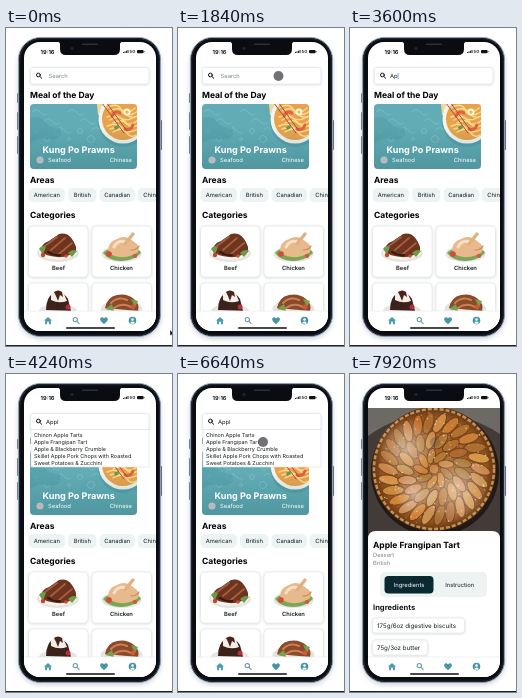
These frames come from a looping animation (166x318 px, 8 s). An HTML page:

```html
<!DOCTYPE html>
<html lang="en">
<head>
<meta charset="utf-8">
<title>Recipe app</title>
<style>
html,body{margin:0;width:100%;height:100%;overflow:hidden;background:#fff}
svg{display:block;width:100vw;height:100vh;font-family:Inter,"Open Sans",sans-serif;font-size:5.8px;text-rendering:geometricPrecision}
text{fill:#15191c;white-space:pre}
.h{font-size:8.5px;font-weight:700;fill:#000}
.b{font-weight:600}
.m{text-anchor:middle}
.w{fill:#fff}
.g{fill:#7d858a}
.card{fill:#fff;stroke:#e3e7e9;stroke-width:.7;filter:url(#soft)}
.chip{fill:#edf2f3}
.line{fill:none;stroke-linecap:round;stroke-linejoin:round}
</style>
</head>
<body>
<svg viewBox="0 0 166 318" preserveAspectRatio="none">
<defs>
  <filter id="soft" x="-20%" y="-20%" width="140%" height="150%"><feDropShadow dx="0" dy=".7" stdDeviation=".8" flood-color="#506068" flood-opacity=".25"/></filter>
  <filter id="halo" x="-20%" y="-20%" width="140%" height="140%"><feGaussianBlur stdDeviation="2.6"/></filter>
  <linearGradient id="shade" x2="0" y2="1"><stop offset=".35" stop-color="#27646e" stop-opacity="0"/><stop offset="1" stop-color="#27646e" stop-opacity=".3"/></linearGradient>
  <radialGradient id="crust"><stop offset="0" stop-color="#b8702c"/><stop offset=".85" stop-color="#94521f"/><stop offset="1" stop-color="#57300f"/></radialGradient>
  <radialGradient id="sugar" cx=".5" cy=".5"><stop offset="0" stop-color="#fff" stop-opacity=".5"/><stop offset="1" stop-color="#fff" stop-opacity="0"/></radialGradient>
  <clipPath id="screen"><rect x="18" y="14" width="132" height="289" rx="16"/></clipPath>
  <clipPath id="body"><rect x="18" y="29" width="132" height="254"/></clipPath>
  <clipPath id="meal"><rect x="24" y="76" width="107" height="65" rx="4"/></clipPath>
  <clipPath id="drop"><rect x="25" y="55.5" width="118" height="37.5"/></clipPath>
  <clipPath id="photo"><rect x="18" y="34" width="132" height="130"/></clipPath>
</defs>

<rect width="166" height="318" fill="#fff"/>
<rect y="317" width="166" height="1" fill="#222"/>

<!-- phone -->
<rect x="12" y="12" width="143" height="299" rx="23" fill="#8493a5" opacity=".4" filter="url(#halo)"/>
<g fill="#46505e">
  <rect x="11.3" y="65" width="2" height="10" rx=".7"/><rect x="11.3" y="84" width="2" height="18" rx=".7"/>
  <rect x="11.3" y="108" width="2" height="18" rx=".7"/><rect x="153.8" y="92" width="2" height="30" rx=".7"/>
</g>
<rect x="12.5" y="9.5" width="142" height="299" rx="22" fill="#0a0c11" stroke="#8f9eb1" stroke-width="1"/>
<rect x="13.7" y="10.7" width="139.6" height="296.6" rx="21" fill="none" stroke="#27303d" stroke-width=".9"/>

<g clip-path="url(#screen)">
  <rect x="18" y="14" width="132" height="289" fill="#fff"/>
  <g clip-path="url(#body)">
    <g id="home">
      <rect x="18" y="29" width="132" height="254" fill="#fff"/>
      <rect x="24.5" y="39.5" width="118.5" height="16.5" rx="3" class="card"/>
      <g class="line" stroke="#111" stroke-width="1"><circle cx="32.4" cy="47" r="1.9"/><path d="M33.9 48.5l1.8 1.8"/></g>
      <text id="hint" x="42.5" y="50" class="g">Search</text>
      <text id="query" x="40" y="50"></text>
      <path id="caret" d="M0 45v6" stroke="#3e7cf0" stroke-width=".7"/>

      <text class="h" x="24" y="70">Meal of the Day</text>
      <g clip-path="url(#meal)">
        <rect x="24" y="76" width="107" height="65" fill="#61acb5"/>
        <g id="waves" class="line" stroke="#8bc5ca" stroke-width=".6"></g>
        <path d="M24 90q10-3 15 4t14 5q5 4 1 9t-13 3-17 5z" fill="#529da8" opacity=".6"/>
        <path d="M91 76h12l-3 9-8 2z" fill="#f3d79c"/>
        <circle cx="117" cy="94" r="25" fill="#4d919d" opacity=".5"/>
        <circle cx="117" cy="91" r="24.5" fill="#f4f5ee"/>
        <circle cx="117" cy="91" r="21" fill="#e9a24c"/>
        <g id="noodles" class="line" stroke="#f9dc8f" stroke-width="1.4"></g>
        <g class="line" stroke="#e0633c" stroke-width="3"><path d="M106 88q3-6 8-3"/><path d="M119 101q6 2 8-4"/></g>
        <circle cx="121" cy="84" r="3.4" fill="#fff6df"/><circle cx="121" cy="84" r="1.6" fill="#efb23e"/>
        <path d="M108 99l4-2 1 3-4 2z" fill="#5f9b56"/>
        <path d="M96 75l22 30M100 74l21 29" class="line" stroke="#b34a3c" stroke-width="1"/>
        <rect x="24" y="76" width="107" height="65" fill="url(#shade)"/>
      </g>
      <text x="36.5" y="125" class="w" font-size="9.1" font-weight="700">Kung Po Prawns</text>
      <circle cx="34" cy="132" r="3.6" fill="#b9babd"/>
      <text x="42" y="134" class="w">Seafood</text>
      <text x="126" y="134" class="w" text-anchor="end">Chinese</text>

      <text class="h" x="24" y="155">Areas</text>
      <g id="areas"></g>
      <text class="h" x="24" y="190">Categories</text>
      <rect x="22.5" y="198" width="59.5" height="51" rx="4" class="card"/>
      <rect x="86" y="198" width="59.5" height="51" rx="4" class="card"/>
      <rect x="22.5" y="255" width="59.5" height="51" rx="4" class="card"/>
      <rect x="86" y="255" width="59.5" height="51" rx="4" class="card"/>
      <text x="52.5" y="242.3" class="b m">Beef</text>
      <text x="115.5" y="242.3" class="b m">Chicken</text>

      <!-- beef -->
      <ellipse cx="52" cy="225" rx="21" ry="9" fill="#e6e4df"/><ellipse cx="52" cy="223.5" rx="19" ry="8" fill="#f7f5ef"/>
      <path d="M35 224q-1-8 8-11l10-7q8-2 13 5t4 12q-8 7-19 6t-16-5z" fill="#6d3420"/>
      <path d="M39 218l12-9M45 222l14-12M53 226l13-11" class="line" stroke="#a65e3c" stroke-width="1.8"/>
      <path d="M42 224q6 4 12 3" class="line" stroke="#35170f" stroke-width="2"/>
      <path d="M33 221q3-5 7-2l-3 7zM62 225q5-5 9-2l-5 6z" fill="#6f9a4a"/><circle cx="37" cy="227" r="2.2" fill="#c8412e"/><circle cx="60" cy="228" r="1.8" fill="#cf4a2e"/>
      <!-- chicken -->
      <ellipse cx="115.5" cy="226" rx="20" ry="8" fill="#e4e5e0"/>
      <path d="M97 225q5-6 12-3l16-1q8-1 10 4-8 8-20 8t-18-8z" fill="#7ba653"/>
      <path d="M102 222q0-8 9-11 8-5 16 2 8 5 5 11-8 6-18 5t-12-7z" fill="#e7b98d"/>
      <path d="M108 219q4-8 12-5" class="line" stroke="#f7dfc4" stroke-width="3"/>
      <path d="M119 216l8-10" class="line" stroke="#e2af80" stroke-width="3.4"/>
      <path d="M125 222q6 0 8-4" class="line" stroke="#c98b58" stroke-width="1.2"/>
      <circle cx="103" cy="226" r="2.8" fill="#d54a34"/><circle cx="129" cy="228" r="2.1" fill="#d9533a"/>
      <!-- dessert -->
      <ellipse cx="52" cy="283" rx="19" ry="7" fill="#e7e4e2"/>
      <path d="M40 282q0-13 8-17 9-2 14 6l3 12z" fill="#3d211b"/><path d="M45 267q6-9 13-1l3 7q-8 3-16-1z" fill="#f3eee8"/>
      <path d="M48 264q4-3 8 0l1 5-3-2-2 6-2-5z" fill="#4a251c"/><circle cx="62" cy="279" r="2.5" fill="#b72d38"/>
      <!-- lamb -->
      <ellipse cx="115.5" cy="281" rx="21" ry="9" fill="#e5e3df"/>
      <path d="M99 280q2-11 12-13t17 4q6 5 4 12z" fill="#8b4a2b"/><path d="M105 275q7-7 16-3M108 280q8-6 17-1" class="line" stroke="#c98250" stroke-width="2"/>
      <path d="M99 281l7-5 2 7zM125 271l7 2-3 6z" fill="#76a04f"/><circle cx="127" cy="279" r="2.4" fill="#d4573a"/>

      <g id="list">
        <rect x="25" y="55.5" width="118" height="37.5" fill="#fff" stroke="#d9dee0" stroke-width=".6"/>
        <g id="rows" clip-path="url(#drop)" font-size="5.4"></g>
      </g>
    </g>

    <g id="detail">
      <rect x="18" y="29" width="132" height="254" fill="#fff"/>
      <g clip-path="url(#photo)">
        <rect x="18" y="34" width="132" height="130" fill="#433b37"/>
        <path d="M18 34h132v26q-30-20-66-20T18 62z" fill="#6d6a66"/>
        <g id="tart"></g>
      </g>
      <path d="M18 284V165q0-8 8-8h116q8 0 8 8v119z" fill="#fff"/>
      <text class="h" x="23" y="174.3" font-size="8.6">Apple Frangipan Tart</text>
      <text x="23" y="183" class="g">Dessert</text>
      <text x="23" y="191.2" class="g">British</text>
      <rect x="30" y="198" width="107" height="25" rx="5" class="chip"/>
      <rect x="34.5" y="202" width="49" height="17.5" rx="4" fill="#0b2930"/>
      <text x="59" y="213" class="w m">Ingredients</text>
      <text x="109.7" y="213" class="m">Instruction</text>
      <text x="23" y="235.5" font-size="7.6" font-weight="700">Ingredients</text>
      <rect x="22.5" y="244" width="92" height="15" rx="3" class="card"/>
      <text x="27" y="253.8" font-size="6.2">175g/6oz digestive biscuits</text>
      <rect x="22.5" y="266" width="55" height="15" rx="3" class="card"/>
      <text x="27" y="275.8" font-size="6.2">75g/3oz butter</text>
    </g>
  </g>

  <!-- tab bar -->
  <rect x="18" y="283" width="132" height="21" fill="#fff"/>
  <path d="M18 283h132" stroke="#e4e8ea" stroke-width=".6"/>
  <path d="M38 292.6l4-3.7 4 3.7h-1.1v3.6h-2v-2.5h-1.8v2.5h-2v-3.6z" fill="#4d9cab"/>
  <g class="line" stroke="#6b9aa5" stroke-width="1.1"><circle cx="69.3" cy="291.6" r="2.1"/><path d="M71 293.3l2.2 2.3"/></g>
  <path d="M98 296.3l-3.3-3.2q-1.4-2.2.3-3.5 1.8-.9 3 .8 1.2-1.7 3-.8 1.7 1.3.3 3.5z" fill="#4595a6"/>
  <circle cx="126.5" cy="292.6" r="3.8" fill="#4595a6"/><circle cx="126.5" cy="291.5" r="1.3" fill="#fff"/><path d="M124.1 294.9q2.4-2.6 4.8 0-2.4 1.9-4.8 0z" fill="#fff"/>
  <rect x="60" y="299.2" width="49" height="1.6" rx=".8" fill="#0c0d10"/>

  <!-- status bar -->
  <text x="34.5" y="26" font-weight="700" font-size="5.6">19:16</text>
  <path d="M117.5 25v-1.1M119 25v-1.7M120.5 25v-2.3M122 25v-3" stroke="#111" stroke-width=".9"/>
  <text x="123.6" y="25.2" class="b" font-size="4.2">5G</text>
  <rect x="131" y="21.9" width="6.6" height="3.4" rx="1" fill="#111"/><path d="M138.3 23v1.2" stroke="#111" stroke-width=".6"/>
</g>
<path d="M51 13.5q3 .3 3 3v4.5q0 6 6 6h48q6 0 6-6v-4.5q0-2.7 3-3z" fill="#0a0c11"/>
<rect x="76" y="15.6" width="16" height="1.3" rx=".6" fill="#2a3038"/><circle cx="66" cy="20.5" r="1.7" fill="#182338"/>

<path id="arrow" d="M0 0v5.6l1.3-1.2 1 2 .9-.4-1-2h1.8z" fill="#111" stroke="#fff" stroke-width=".3"/>
<circle id="dot" r="5" fill="#505357"/>
<path id="ring" class="line" d="M2.4-1.6A2.8 2.8 0 1 0 2.4 1.6" stroke="#6d7276" stroke-width="1"/>
</svg>

<script>
const $ = id => document.getElementById(id);
const LOOP = 8000, STEP = 80;

function add(parent, tag, attrs, label) {
  const el = document.createElementNS("http://www.w3.org/2000/svg", tag);
  for (const k in attrs) el.setAttribute(k, attrs[k]);
  if (label) el.textContent = label;
  return parent.appendChild(el);
}

let seed = 17;
const rnd = () => (seed = (seed * 16807) % 2147483647) / 2147483647;

[["American", 22.5, 36.5], ["British", 62, 28.5], ["Canadian", 93.5, 35.5], ["Chinese", 131.5, 34]].forEach(([name, x, w]) => {
  add($("areas"), "rect", { x, y: 160, width: w, height: 14, rx: 5, class: "chip" });
  add($("areas"), "text", { x: x + w / 2, y: 169, class: "m" }, name);
});

["Chinon Apple Tarts", "Apple Frangipan Tart", "Apple & Blackberry Crumble",
 "Skillet Apple Pork Chops with Roasted", "Sweet Potatoes & Zucchini"]
  .forEach((s, i) => add($("rows"), "text", { x: 28, y: 62.7 + i * 7.15 }, s));

for (let i = 0; i < 6; i++) {
  add($("waves"), "path", { d: `M${26 + i * 12} ${84 + i % 3 * 9}q4-5 8 0t7 2` });
  add($("waves"), "circle", { cx: 30 + i * 11, cy: 103 + i % 2 * 8, r: 1.5 + i % 3 });
}
for (let i = 0; i < 9; i++)
  add($("noodles"), "path", { d: `M${101 + i % 3 * 3} ${80 + i * 3}q9-${6 - i % 4} 14 1t14-1` });

// apple slices in rings, dusted with sugar
const cx = 84, cy = 95, tart = $("tart");
add(tart, "circle", { cx: cx + 1, cy: cy + 3, r: 64, fill: "#211a17" });
add(tart, "circle", { cx, cy, r: 62, fill: "url(#crust)" });
add(tart, "circle", { cx, cy, r: 60, fill: "none", stroke: "#c39058", "stroke-width": 2.5, "stroke-dasharray": "4 2" });
[[46, 26, 11, 4.8], [29, 17, 9.5, 4.6], [13, 9, 8, 4]].forEach(([r, n, rx, ry], ring) => {
  for (let i = 0; i < n; i++) {
    const a = i * 360 / n + ring * 9;
    add(tart, "ellipse", {
      cx: r, cy: 0, rx, ry, fill: `hsl(${27 + rnd() * 7},${52 + rnd() * 12}%,${42 + rnd() * 16}%)`,
      stroke: "#70401c", "stroke-width": 1, transform: `translate(${cx} ${cy}) rotate(${a}) rotate(24 ${r} 0)`
    });
  }
});
add(tart, "circle", { cx, cy, r: 5, fill: "#c78140", stroke: "#70401c" });
[[57, 75, 30], [105, 115, 34], [65, 120, 22]].forEach(([x, y, r]) =>
  add(tart, "circle", { cx: x, cy: y, r, fill: "url(#sugar)" }));
for (let i = 0; i < 170; i++) {
  const a = rnd() * 6.283, r = Math.sqrt(rnd()) * 57;
  add(tart, "circle", { cx: cx + r * Math.cos(a), cy: cy + r * Math.sin(a), r: .3 + rnd() * .6, fill: "#fff4e4", opacity: .3 + rnd() * .4 });
}

// pointer path: time, x, y
const path = [[0, 164, 302], [320, 164, 302], [800, 142, 205], [1440, 100.5, 48], [3200, 100.5, 48],
              [4960, 90, 38], [5360, 90, 38], [6080, 85, 68], [8000, 85, 68]];
const typed = [[3280, "A"], [3520, "Ap"], [3760, "App"], [4000, "Appl"]];
const ease = p => p * p * (3 - 2 * p);

function pointer(t) {
  const i = Math.max(1, path.findIndex(p => p[0] > t));
  const [t0, x0, y0] = path[i - 1], [t1, x1, y1] = path[i];
  const k = ease((t - t0) / (t1 - t0));
  return [x0 + (x1 - x0) * k, y0 + (y1 - y0) * k];
}

const show = (id, on) => $(id).setAttribute("visibility", on ? "visible" : "hidden");
const move = (id, x, y, s = 1) => $(id).setAttribute("transform", `translate(${x} ${y}) scale(${s})`);

function draw(t) {
  const [x, y] = pointer(t);
  const inside = x < 153, hidden = t >= 3200 && t < 4960, ring = t >= 4960 && t < 5360;
  const press = (t >= 2080 && t < 2240) || (t >= 6960 && t < 7120);
  show("arrow", !inside);
  show("dot", inside && !hidden && !ring);
  show("ring", ring);
  move("arrow", x, y);
  move("dot", x, y, press ? .88 : 1);
  move("ring", x, y);
  $("dot").setAttribute("opacity", t >= 7360 ? .3 : press ? .95 : .82);

  const word = typed.filter(w => w[0] <= t).pop();
  $("query").textContent = word ? word[1] : "";
  show("hint", t < 2240);
  show("caret", t >= 2240 && t < 4000 && t % 1040 < 520);
  move("caret", 40.5 + (word ? $("query").getComputedTextLength() : 0), 0);
  show("list", t >= 4000);

  const p = Math.min(1, Math.max(0, (t - 7200) / 400)), k = 1 - (1 - p) ** 3;
  show("detail", p > 0);
  move("detail", 132 * (1 - k), 0);
  move("home", -40 * k, 0);
}

function tick() {
  draw(Math.floor(performance.now() % LOOP / STEP) * STEP);
  requestAnimationFrame(tick);
}
tick();
</script>
</body>
</html>
```
